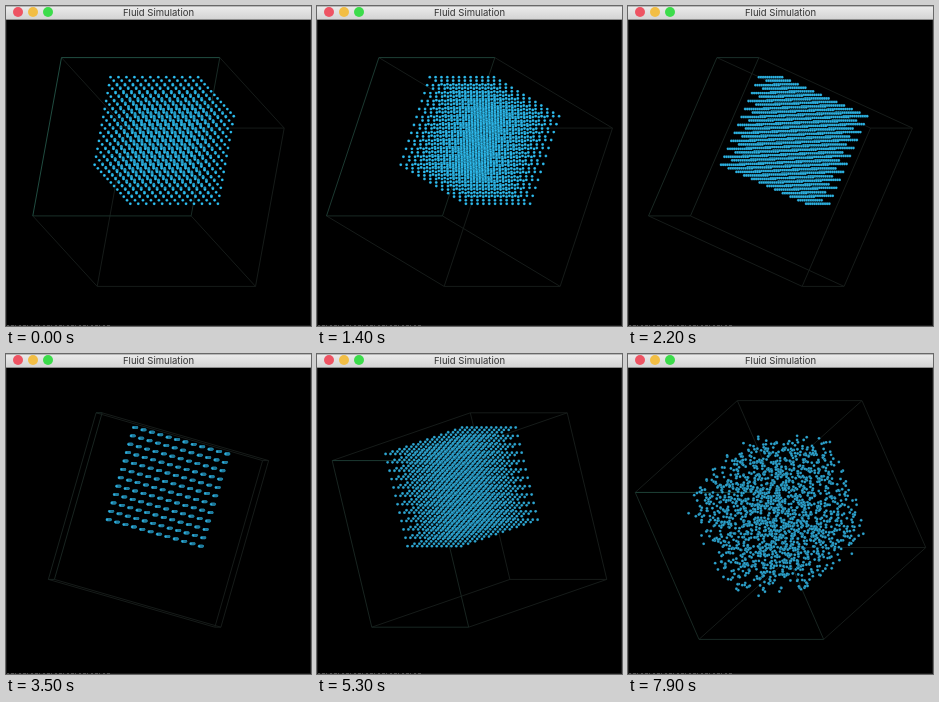
Write an HTML page with a canvas that moves like this. It is 305 by 320 pixels and loops after 8 s.

```html
<!DOCTYPE html>
<html lang="en">
<head>
<meta charset="utf-8">
<title>Fluid Simulation</title>
<style>
  html, body { margin: 0; width: 100%; height: 100%; overflow: hidden; background: #000; }
  #stage { position: relative; width: 305px; height: 320px; overflow: hidden; background: #000; }
  canvas { position: absolute; left: 0; top: 0; width: 305px; height: 320px; }
  .bar {
    position: absolute; left: 0; top: 0; width: 305px; height: 14px; box-sizing: border-box;
    background: linear-gradient(#eaeaea, #d4d4d4);
    border: solid; border-width: 1px 0; border-color: #b8b8b8 #000 #8c8c8c;
    font: 9.5px/11px Inter, Arial, sans-serif; color: #333; text-align: center;
  }
  .bar i { position: absolute; top: 0; width: 10px; height: 10px; border-radius: 50%; }
  .close { left: 6.5px; background: #ee5463; }
  .min { left: 21.5px; background: #f2be45; }
  .zoom { left: 36.5px; background: #3cdc4b; }
</style>
</head>
<body>
<div id="stage">
  <canvas id="view"></canvas>
  <div class="bar"><i class="close"></i><i class="min"></i><i class="zoom"></i>Fluid Simulation</div>
</div>
<script>
const LOOP = 8000, STEP = 100, TURN = 4;   // the view turns in steps of 4 degrees
const HALF = 86.65;                        // half of the box edge
const N = 12, GAP = 8.72, LIFT = -34.5;    // particle lattice
const SPILL = 7400;                        // the fluid is let go
const canvas = document.getElementById('view');
const ctx = canvas.getContext('2d');
const ratio = window.devicePixelRatio || 1;
canvas.width = 305 * ratio;
canvas.height = 320 * ratio;
ctx.scale(ratio, ratio);

const drags = [
  { from: 0, to: 700, yaw: 8, pitch: 0 },
  { from: 1100, to: 2000, yaw: 44, pitch: 0 },
  { from: 2200, to: 2600, yaw: 8, pitch: 0 },
  { from: 2700, to: 3500, yaw: 8, pitch: -8 },
  { from: 3600, to: 4300, yaw: 4, pitch: -32 },
  { from: 4700, to: 5600, yaw: 40, pitch: 0 },
  { from: 5600, to: 6100, yaw: 0, pitch: -16 }
];

const clamp = v => Math.min(1, Math.max(0, v));
const stepped = v => Math.sign(v) * Math.ceil(Math.abs(v) / TURN) * TURN;

function viewAt(t) {
  let yaw = 24, pitch = 24;
  for (const d of drags) {
    const f = clamp((t - d.from) / (d.to - d.from));
    yaw += stepped(d.yaw * f);
    pitch += stepped(d.pitch * f);
  }
  const y = yaw * Math.PI / 180, p = pitch * Math.PI / 180;
  const cy = Math.cos(y), sy = Math.sin(y), cp = Math.cos(p), sp = Math.sin(p);
  const project = ([a, b, c]) => [
    152.5 + a * cy - b * sp * sy + c * cp * sy,
    166 + b * cp + c * sp,
    -a * sy - b * cy * sp + c * cy * cp
  ];
  return { project, cy };
}

function spreadAt(t) {
  if (t < SPILL) return 0;
  return t < 7900 ? (t < SPILL + STEP ? 0.1 : 0.3) : 1;
}

function random(seed) {
  return () => {
    seed = (seed * 1664525 + 1013904223) >>> 0;
    return seed / 4294967296;
  };
}

const rnd = random(41);
const jitter = () => (rnd() - 0.5) * 15;
const at = n => (n - (N - 1) / 2) * GAP;
const dots = Array.from({ length: N ** 3 }, (_, i) => {
  const p = [at(i % N), at(Math.floor(i / N) % N), at(Math.floor(i / N / N))];
  return { p, r: Math.hypot(...p) / 84, j: p.map(jitter) };
});

function edge(project, a, b, glow) {
  const [x1, y1] = project(a.map(v => v * HALF));
  const [x2, y2] = project(b.map(v => v * HALF));
  ctx.strokeStyle = `rgb(${22 + 12 * glow},${27 + 58 * glow},${25 + 46 * glow})`;
  ctx.beginPath();
  ctx.moveTo(x1, y1);
  ctx.lineTo(x2, y2);
  ctx.stroke();
}

function drawBox({ project, cy }) {
  const ring = [[-1, -1], [1, -1], [1, 1], [-1, 1]];
  const glow = 0.3 + 0.7 * cy * cy;
  const light = [1, 0.3, 0.4, 0.55 + 0.45 * cy];
  ctx.lineWidth = 1;
  ring.forEach((p, i) => {
    const q = ring[(i + 1) % 4];
    edge(project, [...p, 1], [...q, 1], 0);
    edge(project, [...p, -1], [...p, 1], 0);
  });
  ring.forEach((p, i) => edge(project, [...p, -1], [...ring[(i + 1) % 4], -1], glow * light[i]));
}

function disc(x, y, r, color) {
  ctx.fillStyle = color;
  ctx.beginPath();
  ctx.arc(x, y, r, 0, 7);
  ctx.fill();
}

function drawDots({ project, cy }, spread) {
  const fall = 27 * spread * spread;
  const fade = (1 - cy) / 2;
  const tint = k => `rgb(${46 * k},${(194 - 34 * fade) * k},${(246 - 44 * fade) * k})`;
  const rim = tint(0.62), core = tint(1);
  const placed = dots.map(({ p, r, j }) => {
    const swell = 1 + (0.45 - 0.4 * r) * spread;
    const q = p.map((v, k) => v * swell + j[k] * spread);
    q[1] += LIFT + fall;
    return project(q);
  });
  placed.sort((a, b) => b[2] - a[2]);
  for (const [x, y] of placed) {
    disc(x, y, 1.45, rim);
    disc(x, y, 1.1, core);
  }
}

function drawRim() {
  ctx.fillStyle = '#1a1a1a';
  ctx.fillRect(0, 14, 1, 306);
  ctx.fillRect(304, 14, 1, 306);
  ctx.fillRect(0, 319, 305, 1);
  ctx.fillStyle = '#555';
  for (let x = 1; x < 104; x += 4) ctx.fillRect(x, 319, 1 + x % 3, 1);
}

function draw(t) {
  const view = viewAt(t);
  ctx.fillStyle = '#000';
  ctx.fillRect(0, 0, 305, 320);
  drawBox(view);
  drawDots(view, spreadAt(t));
  drawRim();
}

let shown = -1;
const start = performance.now();
function tick() {
  const t = Math.floor((performance.now() - start) % LOOP / STEP) * STEP;
  if (t !== shown) draw(shown = t);
  requestAnimationFrame(tick);
}
tick();
</script>
</body>
</html>
```
